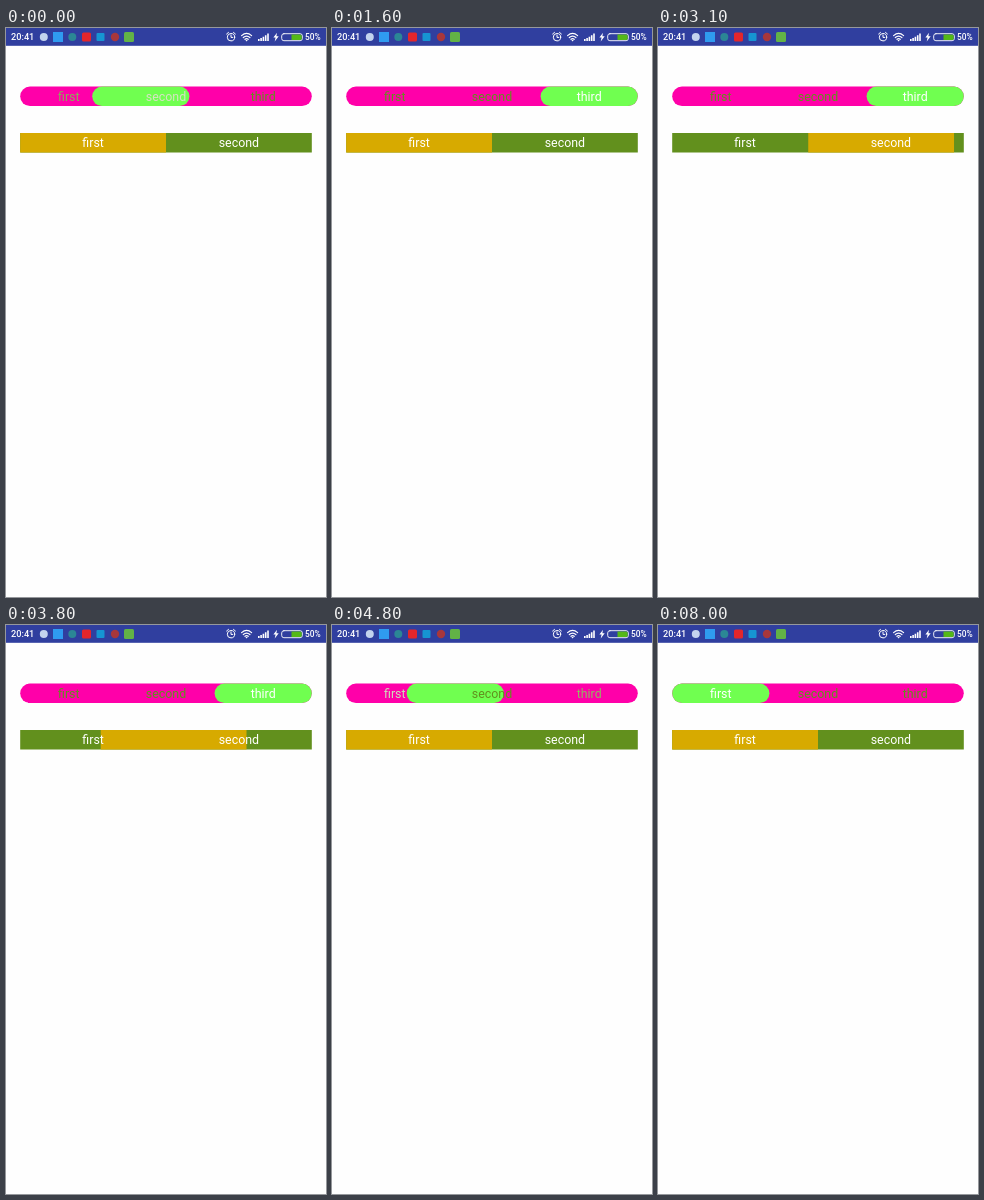
An HTML page that plays this animation: 320 by 569 pixels, repeating every 8100 ms.

```html
<!DOCTYPE html>
<html lang="en">
<head>
<meta charset="utf-8">
<title>Segmented controls</title>
<style>
html, body { margin: 0; width: 100%; height: 100%; overflow: hidden; background: #fefefe; }
svg { display: block; width: 320px; height: 569px; }
text { font: 12.4px Roboto, sans-serif; fill: #fff; text-anchor: middle; }
.status text { font-weight: 500; text-anchor: start; }
.line { fill: none; stroke: #fff; stroke-linecap: round; }
</style>
</head>
<body>
<svg viewBox="0 0 320 569">
  <g class="status">
    <rect width="320" height="17.8" fill="#303f9f"/>
    <text x="5" y="12.2" style="font-size:9.2px">20:41</text>
    <circle cx="37.8" cy="9" r="4" fill="#c3d3ee"/>
    <rect x="47" y="4" width="10" height="10" fill="#2f9bf0"/>
    <circle cx="66.3" cy="9" r="4" fill="#2b8795"/>
    <rect x="76" y="4.5" width="9" height="9" rx="1.5" fill="#e3262b"/>
    <rect x="90.5" y="5" width="8" height="8" rx="1" fill="#1695d2"/>
    <circle cx="109" cy="9" r="4.2" fill="#a8373b"/>
    <rect x="118" y="4" width="10" height="10" rx="1.5" fill="#62b246"/>
    <g class="line">
      <circle cx="225" cy="9.2" r="3.7"/>
      <path d="M225 7v2.4h1.8M220.6 6l1.9-1.6M229.4 6l-1.9-1.6"/>
      <path stroke-width="1.2" d="M235.6 7.6q5-4.4 10 0M237.3 9.5q3.3-2.8 6.6 0M239 11.3q1.6-1.3 3.2 0"/>
      <rect x="275.7" y="5.7" width="20.6" height="7" rx="2.2" stroke-width=".9"/>
    </g>
    <path fill="#fff" d="M239.4 12h2.4l-1.2 1.4zM252 11h1.6v2h-1.6zM254.3 10h1.6v3h-1.6zM256.6 8.7h1.6v4.3h-1.6zM258.9 7.3h1.6v5.7h-1.6zM261.2 5.6h1.6v7.4h-1.6zM271 4.8l-3.6 4.8h2.2l-.9 3.8 4-5.2h-2.3z"/>
    <path fill="#54b818" d="M285.5 6.4h8.6q1.6 0 1.6 1.6v2.4q0 1.6-1.6 1.6h-8.6z"/>
    <text x="299" y="12.1" style="font-size:8.4px">50%</text>
  </g>

  <rect x="14.2" y="58.6" width="291.6" height="19.5" rx="9.75" fill="#ff00a9"/>
  <rect id="pill" y="58.6" width="97.2" height="19.5" rx="9.75" fill="#70ff50"/>
  <g id="labels">
    <text x="62.8" y="73.4">first</text>
    <text x="160" y="73.4">second</text>
    <text x="257.2" y="73.4">third</text>
  </g>

  <rect x="14.2" y="105" width="291.6" height="19.5" fill="#62901d"/>
  <rect id="block" y="105" width="145.8" height="19.5" fill="#d7aa00"/>
  <text x="87.1" y="119.4">first</text>
  <text x="232.9" y="119.4">second</text>
</svg>
<script>
const LOOP = 8100, STEP = 100, DURATION = 300, LEFT = 14.2;
const GREEN = [98, 144, 29];

// Moves: [start, from, to], in segment indices
const pillMoves = [[-198, 0, 1], [1100, 1, 2], [4613, 2, 0]];
const blockMoves = [[2850, 0, 1], [3660, 1, 0]];

const pill = document.getElementById('pill');
const block = document.getElementById('block');
const labels = [...document.getElementById('labels').children];

function stateAt(moves, t) {
  const [start, from, to] = moves.filter(m => m[0] <= t).pop() || [0, 0, 0];
  const x = Math.min(1, (t - start) / DURATION);
  const p = 0.5 - Math.cos(Math.PI * x) / 2;
  return { from, to, p, pos: from + (to - from) * p };
}

function draw(now) {
  const t = Math.floor(now % LOOP / STEP) * STEP;
  const s = stateAt(pillMoves, t);
  pill.setAttribute('x', LEFT + s.pos * 97.2);
  block.setAttribute('x', LEFT + stateAt(blockMoves, t).pos * 145.8);
  labels.forEach((label, i) => {
    const white = i === s.to ? s.p : i === s.from ? 1 - s.p : 0;
    label.style.fill = `rgb(${GREEN.map(c => Math.round(c + (255 - c) * white))})`;
  });
}

const begin = performance.now();
function tick() {
  draw(performance.now() - begin);
  requestAnimationFrame(tick);
}
tick();
</script>
</body>
</html>
```
